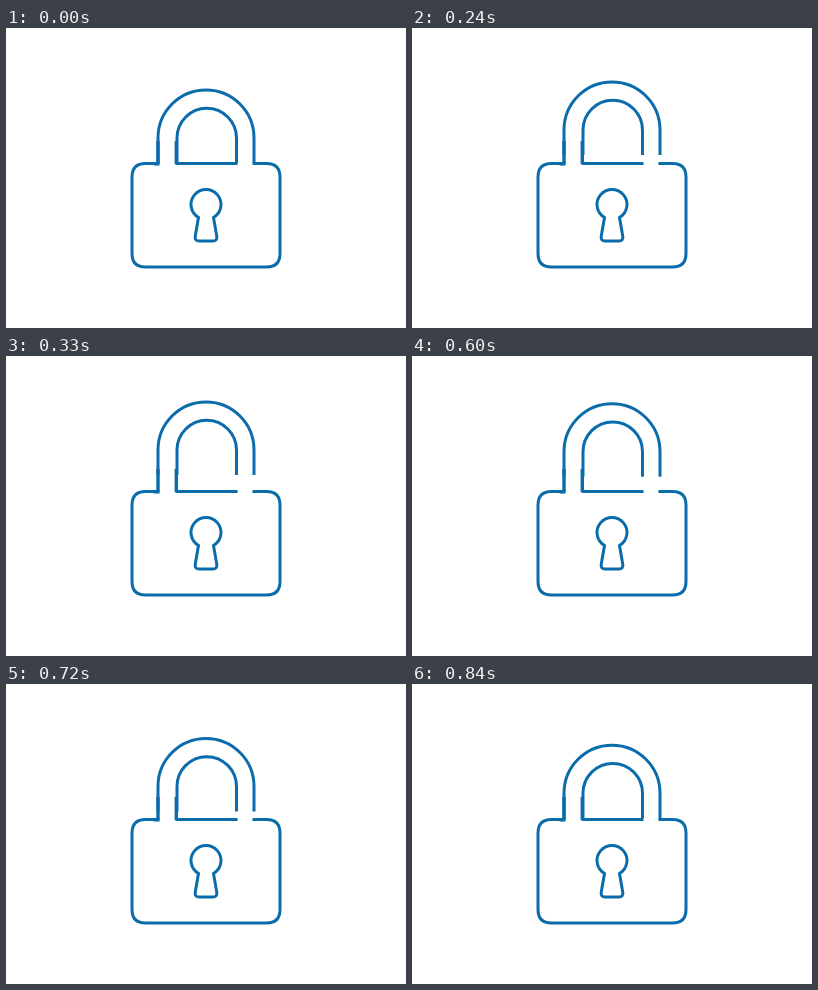
Animation of 400x300 px, one loop 1.41 s. Source, as an HTML page with a canvas:

```html
<!DOCTYPE html>
<html lang="en">
<head>
<meta charset="utf-8">
<title>Padlock</title>
<style>
html, body { margin: 0; width: 100%; height: 100%; overflow: hidden; background: #fff; }
canvas { display: block; }
</style>
</head>
<body>
<canvas id="stage" width="400" height="300"></canvas>
<script>
const ctx = document.getElementById('stage').getContext('2d');
const LOOP = 1410, STEP = 30, LIFT = 16;

// Shackle height in px, moving in 30 ms steps
function liftAt(t) {
  const steps = start => Math.floor((t - start) / STEP) + 1;
  if (t < 180) return 0;
  if (t < 600) return LIFT * Math.min(steps(180) / 6, 1);
  return LIFT * (1 - Math.min(steps(600), 9) / 9.5);
}

function stroke(d, width = 3) {
  ctx.lineWidth = width;
  ctx.stroke(new Path2D(d));
}

function drawBody() {
  stroke('M153 135.5H139.5Q126 135.5 126 149V225.5Q126 239 139.5 239H260.5Q274 239 274 225.5V149Q274 135.5 260.5 135.5H246.5');
  stroke('M169.5 135.5H231.5');
  stroke('M147.5 135.8H153.5', 3.5);
  stroke('M152 113V136M170.3 113V136', 3.4);
}

function drawKeyhole() {
  stroke('M192.5 189.5A15 15 0 1 1 207.5 189.5L210.8 208.5Q211.3 213 207 213H193Q188.7 213 189.2 208.5Z');
}

function drawShackle(lift) {
  ctx.save();
  ctx.translate(0, -lift);
  stroke('M152 135V110A48 48 0 0 1 248 110V135');
  stroke('M171 135V110A29.5 29.5 0 0 1 230.5 110V135');
  ctx.restore();
}

function frame(now) {
  ctx.fillStyle = '#fff';
  ctx.fillRect(0, 0, 400, 300);
  ctx.strokeStyle = '#0b6cac';
  drawShackle(liftAt(now % LOOP));
  drawBody();
  drawKeyhole();
  requestAnimationFrame(frame);
}
requestAnimationFrame(frame);
</script>
</body>
</html>
```
